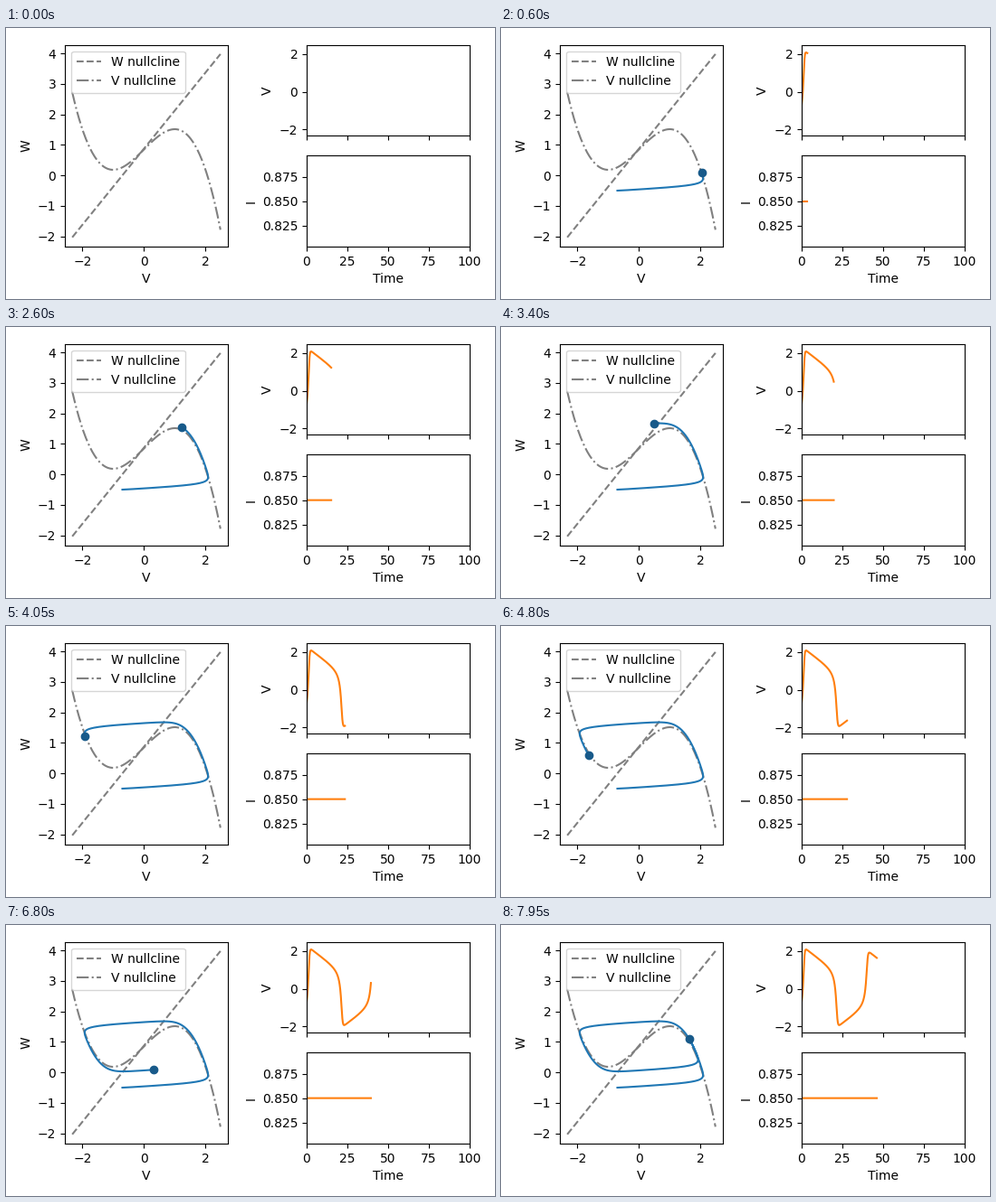
These frames come from a looping animation (540x300 px, 8 s). A matplotlib script:

```python
import numpy as np
import matplotlib.pyplot as plt
from matplotlib.animation import FuncAnimation

WIDTH, HEIGHT, DPI = 540, 300, 100
FRAMES, INTERVAL = 160, 50
DT, T_END = 0.01, 100
A, B, EPS, CURRENT = 0.7, 0.8, 0.08, 0.85
START = (-0.7, -0.5)


def v_nullcline(v):
    return v - v**3 / 3 + CURRENT


def w_nullcline(v):
    return (v + A) / B


def slope(v, w):
    return v_nullcline(v) - w, EPS * (v + A - B * w)


def simulate():
    """FitzHugh-Nagumo trajectory by fourth order Runge-Kutta."""
    v, w = START
    path = [(v, w)]
    for _ in range(int(T_END / DT)):
        a, b = slope(v, w)
        c, d = slope(v + a * DT / 2, w + b * DT / 2)
        e, f = slope(v + c * DT / 2, w + d * DT / 2)
        g, h = slope(v + e * DT, w + f * DT)
        v += DT * (a + 2 * c + 2 * e + g) / 6
        w += DT * (b + 2 * d + 2 * f + h) / 6
        path.append((v, w))
    return np.array(path).T


def add_axes(left, top, width, height, **kw):
    """Axes placed in pixels from the top left corner."""
    box = [left / WIDTH, 1 - (top + height) / HEIGHT, width / WIDTH, height / HEIGHT]
    return fig.add_axes(box, **kw)


V, W = simulate()
T = np.arange(V.size) * DT
I = np.full(V.size, CURRENT)

# Playback speed: the second upstroke passes V = 0.32 after 136 steps.
upstrokes = np.flatnonzero((V[:-1] < 0.32) & (V[1:] >= 0.32))
STEP = upstrokes[1] / 136

pad = 0.1 * (V.max() - V.min())
v_lo, v_hi = V.min() - pad, V.max() + pad
grid = np.linspace(v_lo, v_hi, 200)

fig = plt.figure(figsize=(WIDTH / DPI, HEIGHT / DPI), dpi=DPI)
phase = add_axes(65, 18.7, 180, 223.2)
volt = add_axes(332, 18.7, 180, 100.5)
curr = add_axes(332, 141.4, 180, 100.5, sharex=volt)

phase.plot(grid, w_nullcline(grid), "--", color="gray", label="W nullcline")
phase.plot(grid, v_nullcline(grid), "-.", color="gray", label="V nullcline")
phase.set(xlabel="V", ylabel="W", xticks=[-2, 0, 2], yticks=range(-2, 5))
phase.legend(loc="upper left")
phase.autoscale_view()
phase.set(xlim=phase.get_xlim(), ylim=phase.get_ylim())

volt.set(ylabel="V", xlim=(0, T_END), ylim=(v_lo, v_hi), yticks=[-2, 0, 2])
volt.tick_params(labelbottom=False)
curr.set(xlabel="Time", ylabel="I", xticks=range(0, 101, 25),
         ylim=(CURRENT * 0.945, CURRENT * 1.055), yticks=[0.825, 0.85, 0.875])

orbit, = phase.plot([], [], color="C0")
dot, = phase.plot([], [], "o", color="#185a8a")
v_line, = volt.plot([], [], color="C1")
i_line, = curr.plot([], [], color="C1")


def update(k):
    n = round(k * STEP) + 1 if k else 0
    orbit.set_data(V[:n], W[:n])
    dot.set_data(V[:n][-1:], W[:n][-1:])
    v_line.set_data(T[:n], V[:n])
    i_line.set_data(T[:n], I[:n])
    return orbit, dot, v_line, i_line


anim = FuncAnimation(fig, update, frames=FRAMES, interval=INTERVAL, repeat=True)
plt.show()
```
